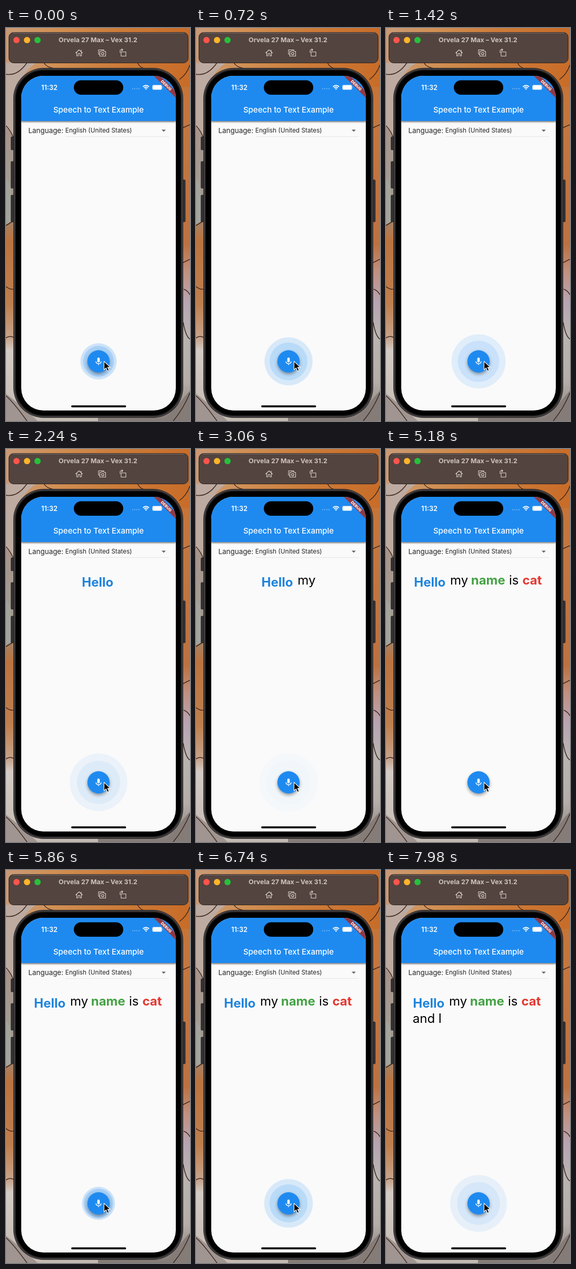
Animation of 350x748 px, one loop 8000 ms. Source, as an HTML page:

```html
<!DOCTYPE html>
<html lang="en">
<head>
<meta charset="utf-8">
<title>Speech to Text Example</title>
<style>
  html, body { margin: 0; width: 100%; height: 100%; overflow: hidden; }
  svg { display: block; width: 350px; height: 748px; }
  text { font-family: Inter, sans-serif; }
  .ink { fill: none; stroke: #3f2a22; stroke-width: 1.5; }
  .icon { fill: none; stroke: #dcd4d0; stroke-width: 1.1; stroke-linejoin: round; stroke-linecap: round; }
  #speech { font-size: 24px; }
  #speech .key { font-weight: 700; }
</style>
</head>
<body>
<svg viewBox="0 0 350 748">
  <defs>
    <linearGradient id="leftWall" x1="0" y1="0" x2="0" y2="1">
      <stop offset="0" stop-color="#b5764a"/>
      <stop offset=".12" stop-color="#b9a093"/>
      <stop offset=".25" stop-color="#a8948a"/>
      <stop offset=".4" stop-color="#a39c94"/>
      <stop offset=".5" stop-color="#a9805f"/>
      <stop offset=".54" stop-color="#bb7440"/>
      <stop offset=".7" stop-color="#bf7f4e"/>
      <stop offset=".79" stop-color="#c7a48c"/>
      <stop offset=".82" stop-color="#d3cbc5"/>
      <stop offset="1" stop-color="#c3bab2"/>
    </linearGradient>
    <linearGradient id="rightWall" x1="0" y1="0" x2="0" y2="1">
      <stop offset="0" stop-color="#c8702e"/>
      <stop offset=".25" stop-color="#c4763e"/>
      <stop offset=".55" stop-color="#bd713f"/>
      <stop offset=".62" stop-color="#c09080"/>
      <stop offset=".7" stop-color="#b8a4b4"/>
      <stop offset=".78" stop-color="#b9b4b0"/>
      <stop offset=".9" stop-color="#b5aea8"/>
      <stop offset="1" stop-color="#857b76"/>
    </linearGradient>
    <linearGradient id="topWall">
      <stop offset="0" stop-color="#c99a78"/>
      <stop offset=".25" stop-color="#d09055"/>
      <stop offset=".6" stop-color="#cc7c3a"/>
      <stop offset="1" stop-color="#c86c28"/>
    </linearGradient>
    <clipPath id="screen"><rect x="29" y="91" width="294" height="637" rx="42"/></clipPath>
    <filter id="soft" x="-50%" y="-50%" width="200%" height="200%"><feGaussianBlur stdDeviation="3"/></filter>
    <filter id="barSoft" x="-5%" y="-50%" width="110%" height="200%"><feGaussianBlur stdDeviation="1.5"/></filter>
  </defs>

  <!-- wallpaper -->
  <rect width="175" height="748" fill="url(#leftWall)"/>
  <rect x="175" width="175" height="748" fill="url(#rightWall)"/>
  <rect width="350" height="112" fill="url(#topWall)"/>
  <path d="M0 66H58Q30 84 16 126V214Q6 190 0 190Z" fill="#bdaaa0"/>
  <path d="M0 286Q14 300 14 366L0 374Z" fill="#a3a49c"/>
  <path d="M0 696L40 728L60 748H0Z" fill="#a09590"/>
  <path d="M300 748L350 690V748Z" fill="#857c78"/>
  <path class="ink" d="M0 88Q22 92 40 66M72 66Q80 80 112 77M250 66Q256 78 270 78M0 186Q10 196 16 214M0 376L16 366M0 492Q10 500 16 496M0 590Q8 584 16 590M0 700Q14 712 40 748M336 190L350 184M336 447L350 440M338 497Q346 500 350 508M337 560Q342 588 350 592M318 748Q338 724 350 694M330 98Q344 88 350 70"/>

  <!-- simulator bar -->
  <rect x="5.5" y="8.5" width="341" height="58" rx="9" fill="#53443f" stroke="#2c2422"/>
  <path d="M13 9.5H339" stroke="#84756f"/>
  <circle cx="20" cy="23" r="6" fill="#ff544c"/>
  <circle cx="40" cy="23" r="6" fill="#ffb429"/>
  <circle cx="60" cy="23" r="6" fill="#26c13c"/>
  <text x="175" y="27.2" text-anchor="middle" font-size="12.4" font-weight="700" fill="#cdc3be">Orvela 27 Max – Vex 31.2</text>
  <g class="icon">
    <path d="M132.5 47.5L139 41.5L145.5 47.5M134.5 46V53H137.3V48.5H140.7V53H143.5V46M143 42V44.5"/>
    <path d="M178 50H176V41.5H186V43M178.5 44.5H181L182 43.2H186L187 44.5H189.5V53.5H178.5Z"/>
    <circle cx="184" cy="48.8" r="2.3"/>
    <path d="M219 45.5H228V53.5H219ZM217 47V43Q217 41.5 219 41.5H222M220 39.5L222.2 41.5L220 43.5"/>
  </g>

  <!-- device -->
  <g fill="#343133" stroke="#161416" stroke-width=".6">
    <rect x="9.5" y="207" width="6" height="25" rx="1.5"/>
    <rect x="9.5" y="254" width="6" height="51" rx="1.5"/>
    <rect x="9.5" y="318" width="6" height="51" rx="1.5"/>
    <rect x="335" y="289" width="6" height="80" rx="1.5"/>
  </g>
  <rect x="14" y="76" width="323" height="666" rx="58" fill="#1d1b1c"/>
  <rect x="16" y="78" width="319" height="662" rx="56" fill="none" stroke="#494546" stroke-width="2"/>
  <rect x="19" y="81" width="313" height="656" rx="53"/>

  <g clip-path="url(#screen)">
    <rect x="29" y="91" width="294" height="637" fill="#fafafa"/>
    <rect x="29" y="172" width="294" height="7" opacity=".5" filter="url(#barSoft)"/>
    <rect x="29" y="91" width="294" height="86" fill="#1e8af0"/>
    <text x="176" y="161.3" text-anchor="middle" font-size="15" font-weight="500" fill="#fff">Speech to Text Example</text>
    <text x="67" y="117.5" font-size="12.8" font-weight="600" fill="#fff">11:32</text>
    <rect x="129" y="99.5" width="94" height="27.5" rx="13.75"/>
    <path d="M240 115.5H254" stroke="#6db3f5" stroke-width="2" stroke-dasharray="2 2"/>
    <path d="M260.5 111.8Q266.3 106.6 272.1 111.8M262.7 114.1Q266.3 111 269.9 114.1" fill="none" stroke="#fff" stroke-width="1.9"/>
    <path d="M264.3 115.5Q266.3 114 268.3 115.5L266.3 117.7Z" fill="#fff"/>
    <rect x="278.5" y="108.5" width="18" height="9" rx="2.6" fill="#fff" stroke="#7fbcf6" stroke-width=".8"/>
    <path d="M298.2 111.5V114.5" stroke="#7fbcf6"/>
    <path d="M281 91H293L323 121V133Z" fill="#933844"/>
    <text transform="translate(305 109) rotate(45)" y="2.7" text-anchor="middle" font-size="7.3" font-weight="800" fill="#fff">DEBUG</text>

    <text x="42.5" y="200" font-size="13.4" fill="#242424">Language:</text>
    <text x="112.8" y="199.3" font-size="11.8" fill="#242424">English (United States)</text>
    <path d="M296 193.5H304L300 197.5Z" fill="#666"/>
    <path d="M113 206.5H310" stroke="#e6e6e6"/>

    <g id="speech"></g>

    <g fill="#1e8af0">
      <circle id="outer" cx="176" cy="634.5"/>
      <circle id="inner" cx="176" cy="634.5"/>
    </g>
    <circle cx="176" cy="637.5" r="21" opacity=".4" filter="url(#soft)"/>
    <circle cx="176" cy="634.5" r="21.2" fill="#1e8af0"/>
    <rect x="173.7" y="627.2" width="4.6" height="9.4" rx="2.3" fill="#fff"/>
    <path d="M171 634.5Q171.3 638.7 176 638.9Q180.7 638.7 181 634.5M176 639V641.5" fill="none" stroke="#fff" stroke-width="1.4"/>
    <rect x="124" y="718.2" width="104.5" height="3.7" rx="1.85"/>
  </g>
  <path d="M186.5 634.5V650.5L190.3 647L193 653L196 651.7L193.3 645.9H198.5Z" stroke="#fff" stroke-width="1.1"/>
</svg>
<script>
const LOOP = 8000;
const GROW_STEPS = 120, CYCLE_STEPS = 128, FIRST_STEP = 48;
const $ = id => document.getElementById(id);

// text, offset from line start, baseline, keyword colour
const words = [
  ['Hello', -.7, 262, '#1e84dc'], ['my', 68, 258], ['name', 107.7, 258, '#43a243'],
  ['is', 180, 258], ['cat', 205.5, 258, '#e53832'], ['and', -1.2, 291], ['I', 47.5, 291]
];
// start time, words shown, left edge
const phrases = [
  [0, 0, 0], [1960, 1, 145], [2520, 2, 125.3], [3520, 3, 89.5],
  [3920, 4, 77], [5160, 5, 54], [7140, 6, 52], [7560, 7, 52]
];

const nodes = words.map(([word, , y, colour]) => {
  const node = document.createElementNS('http://www.w3.org/2000/svg', 'text');
  node.textContent = word;
  node.setAttribute('y', y);
  node.setAttribute('fill', colour || '#000');
  if (colour) node.setAttribute('class', 'key');
  return $('speech').appendChild(node);
});

const mix = (a, b, k) => a + (b - a) * k;

// cubic-bezier(.4, 0, .2, 1)
function fastOutSlowIn(x) {
  let low = 0, high = 1;
  for (let i = 0; i < 24; i++) {
    const s = (low + high) / 2, r = 1 - s;
    if (1.2 * s * r * r + .6 * s * s * r + s ** 3 < x) low = s; else high = s;
  }
  return low * low * (3 - 2 * low);
}

function disc(id, radius, opacity) {
  $(id).setAttribute('r', radius);
  $(id).setAttribute('opacity', opacity);
}

// Three uneven steps per 140 ms
function stepAt(t) {
  const rest = t % 140;
  return 3 * Math.floor(t / 140) + (rest < 20 ? 0 : rest < 120 ? 1 : 2);
}

function draw(t) {
  const phase = Math.min(1, (FIRST_STEP + stepAt(t)) % CYCLE_STEPS / GROW_STEPS);
  const grow = fastOutSlowIn(phase);
  const opacity = .34 * (1 - phase);
  disc('outer', 56.1 * grow, opacity);
  disc('inner', mix(9.35, 42.1, grow), opacity);

  const [, count, left] = phrases.filter(p => p[0] <= t).pop();
  nodes.forEach((node, i) => {
    node.setAttribute('x', left + words[i][1]);
    node.setAttribute('visibility', i < count ? 'visible' : 'hidden');
  });
}

const start = performance.now();
function tick() {
  draw((performance.now() - start) % LOOP);
  requestAnimationFrame(tick);
}
tick();
</script>
</body>
</html>
```
